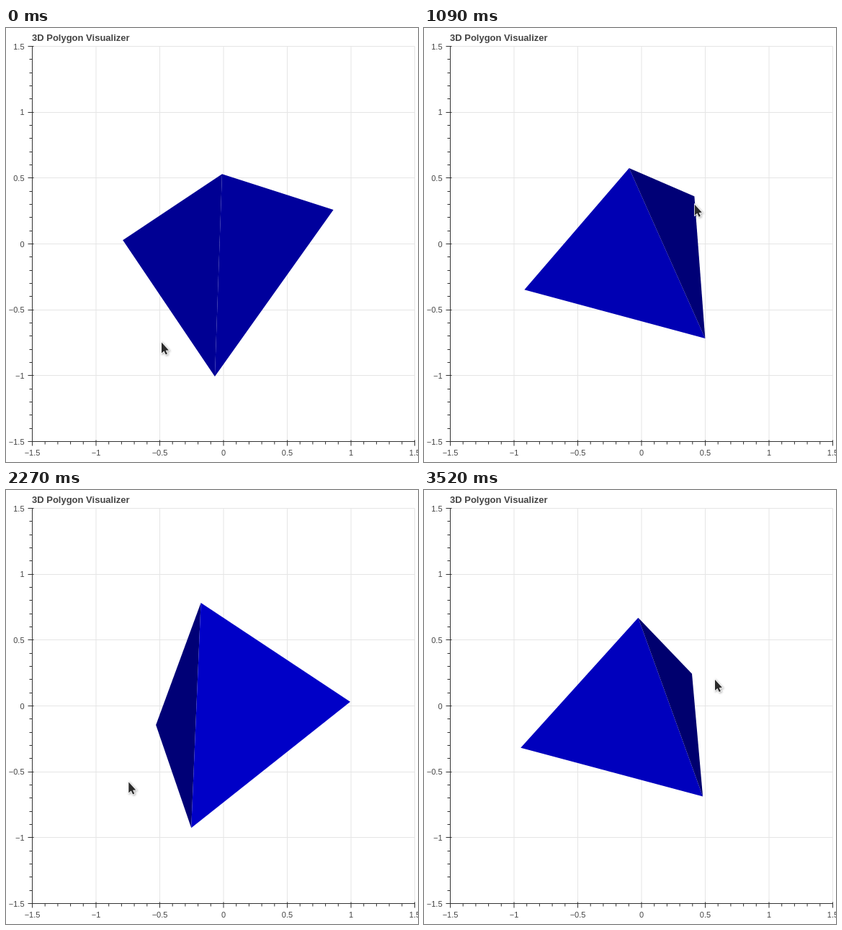
Animation, 572 px wide and 604 px high, one loop 3.58 s. Source, as an HTML page with a canvas:

```html
<!DOCTYPE html>
<html lang="en">
<head>
<meta charset="utf-8">
<title>3D Polygon Visualizer</title>
<style>
  html, body { margin: 0; width: 100%; height: 100%; overflow: hidden; background: #fff; }
  canvas { display: block; }
</style>
</head>
<body>
<canvas id="stage" width="572" height="604"></canvas>
<script>
const ctx = document.getElementById('stage').getContext('2d');
const LOOP = 3580, STEP = 30.345, LAST = 116;
const LEFT = 36.5, RIGHT = 567.5, TOP = 25.5, BOTTOM = 575.5;
const SX = (RIGHT - LEFT) / 3, SY = (BOTTOM - TOP) / 3;
const CX = 301.8, CY = 300.5;

// The solid turns 0.01 rad per dragged pixel from its rest point, a few steps behind the pointer
const REST = [406, 368], DRAG = 0.01, LAG = 3;
const corners = [[0.405, 0.89, -0.27], [-0.935, -0.01, -0.4], [0.49, -0.845, -0.26], [-0.055, -0.32, 1]];

// Drag path: step, x, y
const path = [
  [0, 188, 420], [12, 300, 476], [27, 441, 375], [45, 320, 196], [56, 183, 216],
  [75, 153, 388], [87, 270, 432], [100, 406, 391], [116, 409, 268], [119, 404, 264],
];

function dragAt(s) {
  const at = j => path[Math.min(Math.max(j, 0), path.length - 1)];
  const i = path.findLastIndex((p, j) => p[0] <= s && j < path.length - 1);
  const p = at(i), q = at(i + 1), span = q[0] - p[0], u = (s - p[0]) / span;
  const slope = (j, k) => (at(j + 1)[k] - at(j - 1)[k]) / (at(j + 1)[0] - at(j - 1)[0]) * span;
  return [1, 2].map(k => p[k] + (q[k] - p[k]) * u * u * (3 - 2 * u)
    + u * (1 - u) * (1 - u) * slope(i, k) - u * u * (1 - u) * slope(i + 1, k));
}

function turn([x, y, z], yaw, pitch) {
  const depth = z * Math.cos(yaw) - x * Math.sin(yaw);
  return [
    x * Math.cos(yaw) + z * Math.sin(yaw),
    y * Math.cos(pitch) - depth * Math.sin(pitch),
    y * Math.sin(pitch) + depth * Math.cos(pitch),
  ];
}

const minus = (a, b) => a.map((v, i) => v - b[i]);
const dot = (a, b) => a[0] * b[0] + a[1] * b[1] + a[2] * b[2];
const cross = (a, b) => [a[1] * b[2] - a[2] * b[1], a[2] * b[0] - a[0] * b[2], a[0] * b[1] - a[1] * b[0]];

function polygon(points) {
  ctx.beginPath();
  points.forEach(([x, y]) => ctx.lineTo(x, y));
  ctx.closePath();
}

function line(x1, y1, x2, y2, color) {
  ctx.strokeStyle = color;
  ctx.beginPath();
  ctx.moveTo(x1, y1);
  ctx.lineTo(x2, y2);
  ctx.stroke();
}

function drawPlot() {
  const gridX = i => LEFT + i * SX / 10;
  const gridY = i => Math.floor(BOTTOM - i * SY / 10) + 0.5;
  ctx.fillStyle = '#fff';
  ctx.fillRect(0, 0, 572, 604);
  ctx.lineWidth = 1;
  for (let i = 0; i <= 30; i += 5) {
    line(gridX(i), TOP, gridX(i), BOTTOM, '#e5e5e5');
    line(LEFT, gridY(i), RIGHT, gridY(i), '#e5e5e5');
  }
  line(LEFT, TOP, LEFT, BOTTOM, '#333');
  line(LEFT, BOTTOM, RIGHT, BOTTOM, '#333');
  ctx.fillStyle = '#444';
  ctx.font = '11px "Liberation Sans", Arial, sans-serif';
  for (let i = 0; i <= 30; i++) {
    const major = i % 5 === 0, out = major ? 6 : 4, inner = major ? 2 : 0;
    line(gridX(i), BOTTOM - inner, gridX(i), BOTTOM + out, '#333');
    line(LEFT - out, gridY(i), LEFT + inner, gridY(i), '#333');
    if (!major) continue;
    const label = String(i / 10 - 1.5).replace('-', '\u2212');
    ctx.textAlign = 'center';
    ctx.fillText(label, gridX(i), 595);
    ctx.textAlign = 'right';
    ctx.fillText(label, 25.5, BOTTOM - i * SY / 10 + 4);
  }
  ctx.textAlign = 'left';
  ctx.font = 'bold 13px "Liberation Sans", Arial, sans-serif';
  ctx.fillText('3D Polygon Visualizer', 36, 18);
}

function drawSolid([x, y]) {
  const turned = corners.map(v => turn(v, (x - REST[0]) * DRAG, (y - REST[1]) * DRAG));
  turned.forEach(opposite => {
    const face = turned.filter(v => v !== opposite);
    const [a, b, c] = face;
    const normal = cross(minus(b, a), minus(c, a));
    const outward = -Math.sign(dot(normal, minus(opposite, a)));
    const facing = outward * normal[2] / Math.hypot(...normal);
    if (facing <= 0) return;
    const light = 1 - Math.acos(facing) / (Math.PI / 2);
    ctx.fillStyle = `rgb(0, 0, ${Math.round(95 + 160 * light)})`;
    polygon(face.map(v => [CX + v[0] * SX, CY - v[1] * SY]));
    ctx.fill();
  });
}

function drawPointer([x, y]) {
  ctx.save();
  ctx.translate(x, y);
  polygon([[0, 0], [0, 15], [3.4, 12], [5.8, 17], [8, 16], [5.7, 11.2], [10, 11]]);
  ctx.shadowColor = 'rgba(0, 0, 0, 0.4)';
  ctx.shadowBlur = 3;
  ctx.shadowOffsetX = ctx.shadowOffsetY = 1;
  ctx.strokeStyle = '#fff';
  ctx.lineWidth = 1.6;
  ctx.stroke();
  ctx.shadowColor = 'transparent';
  ctx.fillStyle = '#2b2b2b';
  ctx.fill();
  ctx.restore();
}

function draw() {
  const s = Math.min(LAST, Math.floor((performance.now() % LOOP + 8) / STEP));
  drawPlot();
  drawSolid(dragAt(s));
  drawPointer(dragAt(s + LAG));
  requestAnimationFrame(draw);
}
draw();
</script>
</body>
</html>
```
